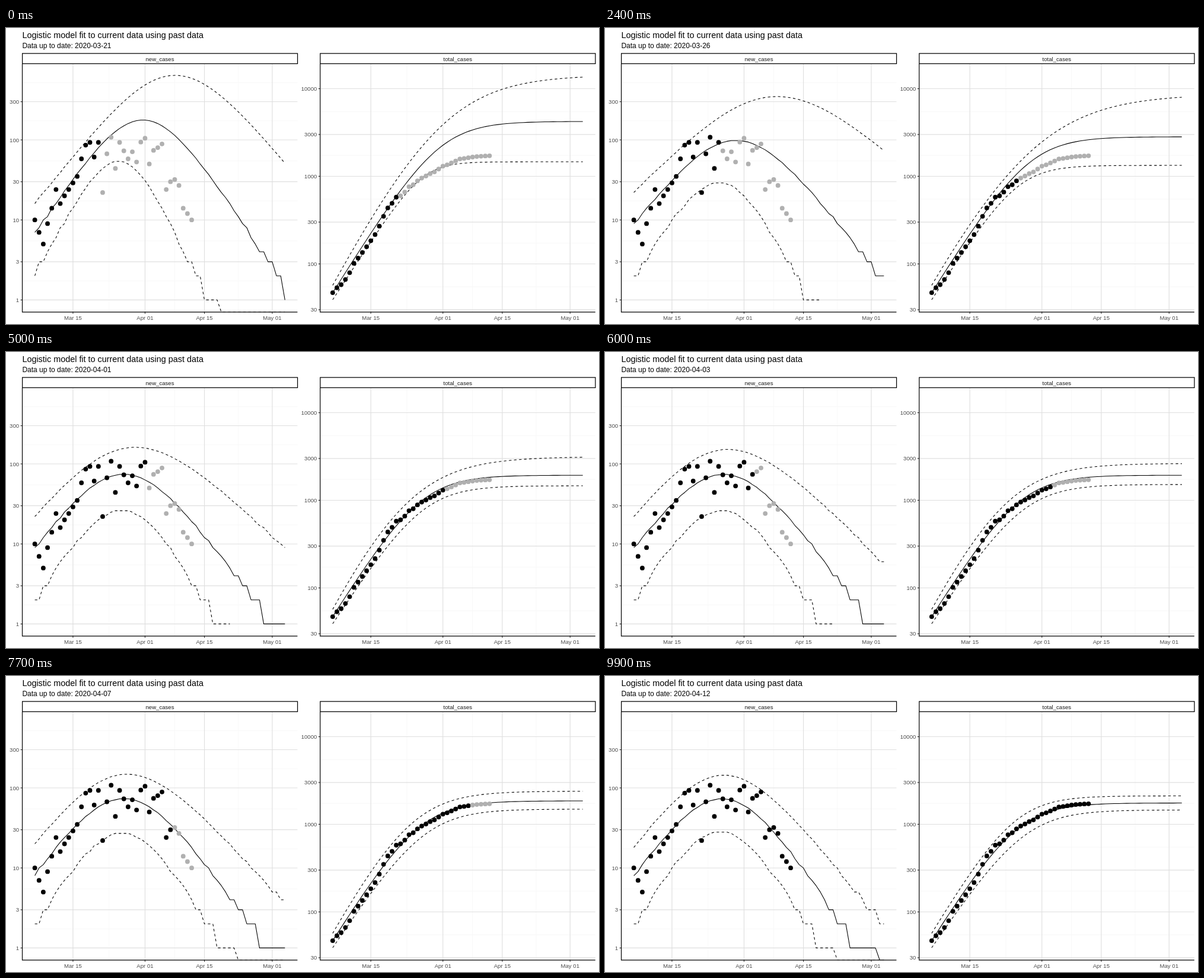
Recreate the animation shown at these times as an HTML page. Size 1000 by 500 pixels, loop 10 s.

```html
<!DOCTYPE html>
<html lang="en">
<head>
<meta charset="utf-8">
<title>Logistic model fit</title>
<style>
  html, body { margin: 0; width: 100%; height: 100%; overflow: hidden; background: #fff; }
  svg { display: block; width: 1000px; height: 500px; font: 9.6px "Liberation Sans", Arial, sans-serif; }
  .title { font-size: 14.4px; }
  .subtitle { font-size: 12px; }
  .strip { fill: #fff; stroke: #000; stroke-width: 1.25; }
  .label { fill: #1a1a1a; text-anchor: middle; }
  .tick-text { fill: #4d4d4d; }
  .minor { stroke: #f5f5f5; stroke-width: .7; }
  .major { stroke: #dfdfdf; stroke-width: 1.15; }
  .tick { stroke: #333; stroke-width: 1.15; }
  .axis { fill: none; stroke: #000; stroke-width: 1.2; }
  .curve { fill: none; stroke: #000; stroke-width: 1.07; stroke-linejoin: round; }
  .dashed { stroke-dasharray: 4.27; }
</style>
</head>
<body>
<svg id="chart" viewBox="0 0 1000 500">
  <text class="title" x="27.4" y="17">Logistic model fit to current data using past data</text>
  <text class="subtitle" id="date" x="27.4" y="34"></text>
</svg>
<script>
const TOP = 60.5, BOTTOM = 479.8, WIDTH = 464, STEP = 7.149, DAYS = 60, LAST = 22;
const chart = document.getElementById('chart');
const dateText = document.getElementById('date');

function add(tag, attrs, parent = chart, text = '') {
  const el = document.createElementNS('http://www.w3.org/2000/svg', tag);
  for (const name in attrs) el.setAttribute(name, attrs[name]);
  el.textContent = text;
  parent.append(el);
  return el;
}

const logScale = (one, decade) => v => one - decade * Math.log10(v);

const newCases = [10, 7, 5, 9, 14, 24, 16, 20, 24, 29, 35, 58, 86, 93, 61, 93, 22, 67, 108,
  44, 93, 73, 58, 71, 53, 94, 105, 50, 74, 80, 89, 24, 30, 32, 27, 14, 12, 10];

// The running total grows a little slower than the reported new cases.
let total = 47;
const totalCases = newCases.map((n, day) => day ? total += n * .925 : total);

// Model parameters: fixed, or key values at these fits, for median, upper and lower curves.
const keySteps = [0, 3, 8, 12, LAST];
const newModels = [
  { start: [6.7, 8.8, 8.8, 8.9, 8], peak: [177, 118, 75, 74, 73],
    peakDay: [25.5, 27, 20.3, 21.2, 21], decay: [.184, .147, .168, .16, .176] },
  { start: [16, 22.5, 22, 22.5, 18.2], peak: [640, 520, 190, 152, 144],
    peakDay: [33, 37.5, 28, 21.5, 21], decay: [.149, .11, .111, .121, .15] },
  { start: 2, peak: [54, 30, 27.5, 26, 28.5],
    peakDay: [20, 21, 20, 21, 20.5], decay: [.26, .23, .228, .2, .2] }
];
const totalModels = [
  { start: 47, cap: [4230, 3726, 1866, 1955, 1751], rate: .178, shape: 1 },
  { start: 57, cap: [14300, 12620, 4940, 2700, 2110],
    rate: [.107, .094, .086, .13, .185], shape: [2, 2, 3, 1.7, 1] },
  { start: 39, cap: [1463, 1353, 1302, 1523, 1458],
    rate: [.285, .22, .211, .171, .166], shape: [.6, .8, .8, 1, 1] }
];

// Geometric blend between neighbouring key values.
function valueAt(track, step) {
  if (!Array.isArray(track)) return track;
  let i = 0;
  while (i < keySteps.length - 2 && step >= keySteps[i + 1]) i++;
  const u = (step - keySteps[i]) / (keySteps[i + 1] - keySteps[i]);
  return track[i] * (track[i + 1] / track[i]) ** u;
}

// Daily counts: a bell with its own growth and decay, in whole cases.
function newCurve({ start, peak, peakDay, decay }) {
  const growth = Math.log(4 * peak / start - 2) / peakDay;
  return day => {
    const x = day - peakDay;
    return Math.round(4 * peak / (2 + Math.exp(-growth * x) + Math.exp(decay * x)));
  };
}

// Generalised logistic growth from start towards cap.
function totalCurve({ start, cap, rate, shape }) {
  const room = (cap / start) ** (1 / shape) - 1;
  return day => cap / (1 + room * Math.exp(-rate * day)) ** shape;
}

// A zero has no place on the log scale: drop to the axis or leave it out.
function pathOf(curve, { x0, scale }, dropZeros) {
  let d = '', pen = 'M';
  for (let day = 0; day < DAYS; day++) {
    const v = curve(day);
    if (!v && !dropZeros) break;
    d += pen + (x0 + day * STEP).toFixed(2) + ' ' + (v ? scale(v) : BOTTOM).toFixed(2);
    pen = 'L';
  }
  return d;
}

function makePanel({ left, name, scale, breaks, minors, points, models, curveOf }) {
  const right = left + WIDTH, x0 = left + 21.1;
  const line = (cls, x1, y1, x2, y2) => add('line', { class: cls, x1, y1, x2, y2 });
  const clip = add('clipPath', { id: name });
  add('rect', { x: left, y: TOP, width: WIDTH, height: BOTTOM - TOP }, clip);

  for (const day of [17.5, 33, 48]) line('minor', x0 + day * STEP, TOP, x0 + day * STEP, BOTTOM);
  for (const v of minors) line('minor', left, scale(v), right, scale(v));
  for (const v of breaks) {
    const y = scale(v);
    line('major', left, y, right, y);
    line('tick', left - 3, y, left, y);
    add('text', { class: 'tick-text', x: left - 5.4, y: y + 3.5, 'text-anchor': 'end' }, chart, v);
  }
  for (const [day, text] of [[9, 'Mar 15'], [26, 'Apr 01'], [40, 'Apr 15'], [56, 'May 01']]) {
    const x = x0 + day * STEP;
    line('major', x, TOP, x, BOTTOM);
    line('tick', x, BOTTOM, x, BOTTOM + 3);
    add('text', { class: 'tick-text', x, y: 493.2, 'text-anchor': 'middle' }, chart, text);
  }

  const plot = add('g', { 'clip-path': `url(#${name})` });
  const paths = ['curve', 'curve dashed', 'curve dashed'].map(cls => add('path', { class: cls }, plot));
  const dots = points.map((v, day) => add('circle', { cx: x0 + day * STEP, cy: scale(v), r: 3.9 }, plot));
  add('path', { class: 'axis', d: `M${left} ${TOP}V${BOTTOM}H${right}` });
  add('rect', { class: 'strip', x: left + .1, y: 43, width: WIDTH, height: 17.3 });
  add('text', { class: 'label', x: left + WIDTH / 2, y: 55.6 }, chart, name);
  return { x0, scale, models, curveOf, paths, dots };
}

const panels = [
  makePanel({
    left: 27.5, name: 'new_cases', scale: logScale(459.4, 135.2),
    breaks: [1, 3, 10, 30, 100, 300], minors: [1.73, 5.48, 17.3, 54.8, 173, 520],
    points: newCases, models: newModels, curveOf: newCurve
  }),
  makePanel({
    left: 529.8, name: 'total_cases', scale: logScale(694.5, 148),
    breaks: [30, 100, 300, 1000, 3000, 10000], minors: [54.8, 173, 548, 1732, 5477],
    points: totalCases, models: totalModels, curveOf: totalCurve
  })
];

// First tick of each fit: 4.5 ticks apart, halves going alternately up and down.
const startOf = step => step % 4 === 1 ? Math.ceil(step * 4.5) : Math.floor(step * 4.5);

function draw(tick) {
  let step = 0;
  while (step < LAST && startOf(step + 1) <= tick) step++;
  const dropZeros = tick === startOf(step);
  const day = 21 + Math.floor(tick * 2 / 9);
  dateText.textContent = 'Data up to date: ' + new Date(Date.UTC(2020, 2, day)).toISOString().slice(0, 10);

  for (const panel of panels) {
    panel.models.forEach((model, i) => {
      const now = {};
      for (const key in model) now[key] = valueAt(model[key], step);
      panel.paths[i].setAttribute('d', pathOf(panel.curveOf(now), panel, dropZeros));
    });
    panel.dots.forEach((dot, i) => dot.setAttribute('fill', i <= 15 + step ? '#000' : '#b0b0b0'));
  }
}

let shown = -1;
function play() {
  const tick = Math.floor(performance.now() % 10000 / 100);
  if (tick !== shown) draw(shown = tick);
  requestAnimationFrame(play);
}
play();
</script>
</body>
</html>
```
